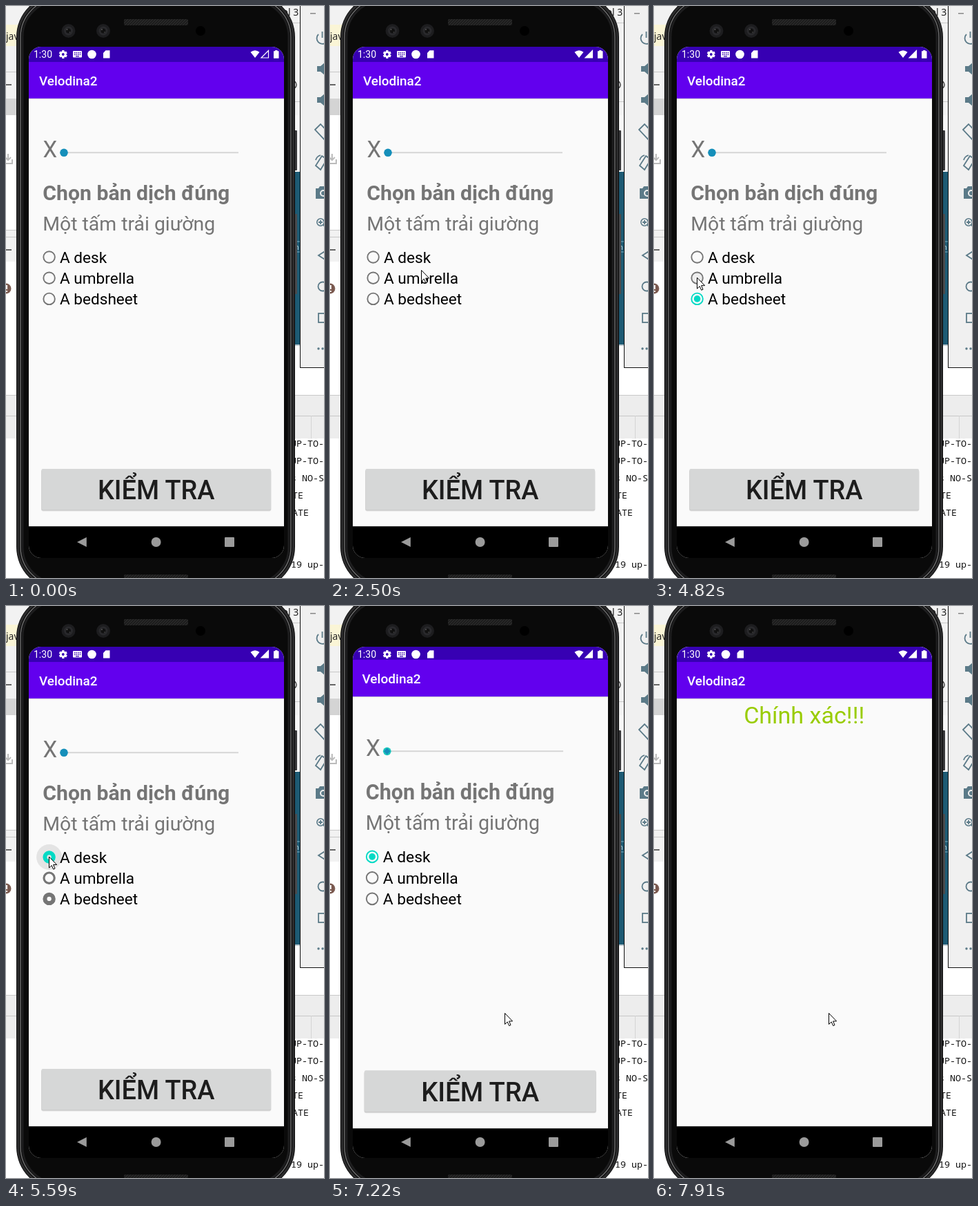
These frames come from a looping animation (461x828 px, 8 s). An HTML page:

```html
<!DOCTYPE html>
<html lang="vi">
<head>
<meta charset="utf-8">
<title>Quiz on a phone emulator</title>
<style>
html, body { margin: 0; width: 100%; height: 100%; overflow: hidden; background: #fff; }
svg { display: block; width: 461px; height: 828px; font-family: Roboto, sans-serif; }
.mono { font: 13.3px "Noto Sans Mono", monospace; fill: #111; }
</style>
</head>
<body>
<svg id="stage" viewBox="0 0 461 828"></svg>
<script>
const LOOP = 8000;
const rect = (x, y, w, h, fill, more = '') =>
  `<rect x="${x}" y="${y}" width="${w}" height="${h}" fill="${fill}" ${more}/>`;
const circle = (x, y, r, fill, more = '') =>
  `<circle cx="${x}" cy="${y}" r="${r}" fill="${fill}" ${more}/>`;
const path = (d, more = '') => `<path d="${d}" ${more}/>`;
const text = (x, y, size, fill, s, more = '') =>
  `<text x="${x}" y="${y}" font-size="${size}" fill="${fill}" ${more}>${s}</text>`;
const mono = (x, y, s) => `<text class="mono" x="${x}" y="${y}">${s}</text>`;

const RADIO_X = 62.6;
const radioY = i => 363.5 + i * 30.2;

function desktop() {
  const rule = (y, x = 0, w = 20) => rect(x, y, w, 1, '#c8c8c8');
  return rect(0, 0, 461, 828, '#fff') +
    rect(0, 0, 461, 158, '#f2f2f2') +
    rect(0, 27, 20, 31, '#faf5d6') +
    text(0, 49, 14, '#222', 'jav', 'font-family="Noto Sans, sans-serif"') +
    rule(95) + rect(0, 113, 8, 2, '#666') +
    rect(0, 134, 20, 24, '#d4d4d4') +
    path('M-4 222V228H9V222M3 214V222M-1 219L3 223L7 219', 'fill="none" stroke="#bbb" stroke-width="2"') +
    rect(0, 324, 20, 46, '#f2f2f2') + rule(324) + rule(334) + rect(0, 352, 8, 2, '#666') +
    circle(0, 409, 7.5, '#7b5a50') + rect(-1, 404, 3, 6, '#fff') + rect(-1, 412, 3, 2, '#fff') +
    rect(0, 563, 461, 63, '#ededed') + rule(563, 0, 461) + rule(593, 0, 461) +
    rect(442, 593, 1, 33, '#d4d4d4') +
    rule(24, 410) + rule(138, 410) +
    text(401, 14, 14, '#222', 'el 3', 'font-family="Noto Sans, sans-serif"') +
    circle(415, 114, 6, 'none', 'stroke="#444" stroke-width="1.5"') +
    rect(410, 158, 18, 82, '#f7f7f7') +
    rect(410, 240, 18, 250, '#1d5a73') + rect(410, 490, 18, 2, '#bcc8ce') +
    rect(415, 341, 14, 15, 'none', 'stroke="#7fb0c4"') +
    text(419, 353, 10, '#cfe3ec', 'n') +
    ['UP-TO-DATE', 'UP-TO-DATE', 's NO-SOURCE', 'TE', 'ATE'].map((s, i) =>
      mono(s.endsWith('TE') && s.length < 4 ? 415 : 413, 638 + i * 25, s)).join('') +
    mono(413, 813, '19 up-to');
}

function toolbar() {
  const line = 'fill="none" stroke="#5b7a88" stroke-width="1.8"';
  const speaker = y => path(`M451 ${y - 4}H456L462 ${y - 9}V${y + 9}L456 ${y + 4}H451Z`, 'fill="#5b7a88"');
  const dot = x => circle(x, 496, 1.7, '#5b7a88');
  return rect(426.5, -2, 40, 525.5, '#f0f0f0', 'stroke="#111"') +
    rect(441, 10, 8, 1.5, '#888') +
    path('M453 41A8 8 0 1 0 464 41M458.5 37V46', line) +
    speaker(91) + speaker(136) +
    path('M448 179L456 171L470 186L462 194Z', line) +
    path('M449 231L458 217L465 222L456 237ZM449 223A10 10 0 0 1 456 216', line) +
    path('M449 264H453L455 261H470V279H449Z', 'fill="#5b7a88"') +
    circle(460, 271, 4, 'none', 'stroke="#f0f0f0" stroke-width="2"') +
    circle(456, 313, 5.2, 'none', 'stroke="#5b7a88" stroke-width="1.6"') +
    path('M460 317L465 322M453 313H459M456 310V316', line) +
    path('M464 354L453 361L464 368', line) +
    circle(459, 406, 6.5, 'none', 'stroke="#5b7a88" stroke-width="1.8"') +
    rect(453, 445, 14, 13, 'none', 'stroke="#5b7a88" stroke-width="1.8"') +
    dot(453) + dot(459) + dot(465);
}

function phone() {
  const shell = (inset, fill, more = '') =>
    rect(15 + inset, inset - 17, 404 - 2 * inset, 862 - 2 * inset, fill, `rx="${62 - inset}" ${more}`);
  const lens = x => circle(x, 36, 10, '#1d1d1f') + circle(x, 36, 6.5, '#29292c') +
    circle(x, 36, 3.5, '#111') + circle(x - 2, 34, 1, '#555') + circle(x + 2, 38, .8, '#555');
  const grille = y => rect(171, y, 93, 9, 'url(#mesh)', 'rx="2"');
  return rect(417, 180, 5, 58, '#3a3a3c', 'rx="1"') + rect(417, 301, 5, 116, '#4a4a4c', 'rx="1"') +
    shell(0, '#0b0b0b') + shell(2.5, 'none', 'stroke="#2c2c2d" stroke-width="3"') +
    shell(6, 'none', 'stroke="#707071" stroke-width="1.4"') +
    shell(9, '#0a0a0a', 'stroke="#1d1d1e" stroke-width="3"') +
    grille(19) + grille(823) + lens(90.5) + lens(141) + circle(282, 36, 7, '#000');
}

// Window shared by both activities, with its own bars
function activity(id, body) {
  return `<g id="${id}">` + rect(33, 59, 370, 740, '#fafafa') + rect(33, 59, 370, 22.5, '#3700b3') +
    rect(33, 133.5, 370, 1.5, '#000', 'opacity=".12"') + rect(33, 81, 370, 52.8, '#6200ee') +
    text(48, 115, 18.9, '#fff', 'Velodina2', 'font-weight="500"') +
    body + rect(33, 753.2, 370, 46.8, '#000') + '</g>';
}

function quiz() {
  const answers = ['A desk', 'A umbrella', 'A bedsheet'];
  return text(53.6, 219, 33, '#757575', 'X') +
    rect(84, 211.3, 253, 1.9, '#d5d5d5') +
    circle(84, 212.3, 5.8, '#158fba', 'id="thumb"') +
    path('M84 207.5L88.8 212.3L84 217.1L79.2 212.3Z', 'fill="#158fba"') +
    text(53.3, 281, 30.2, '#757575', 'Chọn bản dịch đúng', 'font-weight="700"') +
    text(53.2, 325, 28.4, '#757575', 'Một tấm trải giường') +
    answers.map((s, i) =>
      circle(RADIO_X, radioY(i), 0, '#000', `id="ripple${i}"`) +
      circle(RADIO_X, radioY(i), 9, 'none', `id="ring${i}"`) +
      circle(RADIO_X, radioY(i), 0, '#03dac5', `id="dot${i}"`) +
      text(78, 372 + i * 30, 22.6, '#000', s)).join('') +
    rect(51, 671.5, 333.5, 60, '#000', 'rx="3" opacity=".09"') +
    rect(51.2, 670.5, 333, 60, '#000', 'rx="3" opacity=".12"') +
    rect(51.5, 670, 332.5, 59.3, '#d6d7d7', 'rx="2"') +
    `<g clip-path="url(#button)">${circle(212, 700, 0, '#000', 'id="press"')}</g>` +
    text(217.7, 714, 37.9, '#1d1d1d', 'KIỂM TRA', 'font-weight="500" text-anchor="middle"');
}

function systemIcons() {
  let teeth = '', keys = '';
  for (let a = 0; a < 360; a += 60) teeth += rect(81.2, 64, 3.2, 4, '#fff', `transform="rotate(${a} 82.8 70)"`);
  for (let i = 0; i < 8; i++) keys += rect(99 + i % 4 * 2.6, 67 + (i >> 2) * 2.6, 1.5, 1.5, '#3700b3');
  return text(40, 75, 14, '#fff', '1:30') +
    teeth + circle(82.8, 70, 3.4, 'none', 'stroke="#fff" stroke-width="2.6"') +
    `<g id="keyboard">${rect(97, 65, 13, 9.5, '#fff', 'rx="1"')}${keys}${rect(101, 72.2, 5, 1.2, '#3700b3')}</g>` +
    `<g id="notices">${circle(124.5, 70, 6.3, '#fff')}` +
    path('M144.5 64.3H150.5V75.6H141V68Z', 'fill="#fff"') + '</g>' +
    path('M354.5 66.8Q361 61.5 367.5 66.8L361 75Z', 'fill="#fff"') +
    path('M380.5 64.5V75H370Z', 'id="signal" stroke="#fff" stroke-width="1.2"') +
    path('M388 65.3H390.2V64H393.4V65.3H395.5V75.8H388Z', 'fill="#fff"') +
    path('M116.8 769V783L103 776Z', 'fill="#9b9b9b"') +
    circle(217.6, 776, 7, '#9b9b9b') + rect(317, 769, 14, 14, '#9b9b9b', 'rx="1"');
}

const stage = document.getElementById('stage');
stage.innerHTML = `<defs>
  <clipPath id="screen"><rect x="33" y="59" width="370" height="740" rx="18"/></clipPath>
  <clipPath id="button"><rect x="51.5" y="670" width="332.5" height="59.3" rx="2"/></clipPath>
  <pattern id="mesh" width="4" height="4" patternUnits="userSpaceOnUse">
    <path d="M0 0H4V4H0Z" fill="#1d1d1d"/><path d="M0 4L4 0" stroke="#303030"/></pattern>
  </defs>` + desktop() + toolbar() + phone() +
  '<g clip-path="url(#screen)">' + activity('quiz', quiz()) +
  activity('result', text(217.7, 170, 34.1, '#99cc00', 'Chính xác!!!', 'text-anchor="middle"')) +
  systemIcons() + '</g>' +
  path('M.5 .5V16.5L4.2 13L6.7 18.6L9 17.6L6.6 12H11.6Z',
    'id="cursor" fill="#fff" stroke="#000" stroke-linejoin="round"');

const el = {};
stage.querySelectorAll('[id]').forEach(n => el[n.id] = n);
const set = (id, attrs) => {
  for (const k in attrs) el[id].setAttribute(k, attrs[k]);
};
const clamp = v => Math.max(0, Math.min(1, v));
const smooth = p => p * p * (3 - 2 * p);

const APPEAR = 550, BEAT = 77.5;
const snap = t => APPEAR + Math.floor((t - APPEAR + 6) / BEAT) * BEAT;

// Radio taps: answer, time pressed
const HOLD = 110;
const taps = [[0, 3230], [1, 3680], [2, 4070], [1, 4740], [2, 5110], [0, 5390]];

// Cursor stops: arrival, travel time, x, y
const stops = [
  [870, 320, 345, 552], [2500, 1170, 132, 382], [2960, 460, 70, 360],
  ...taps.map(([i, down]) => [down - 100, 180, 62, radioY(i) - 1]),
  [6120, 400, 212, 698], [6900, 400, 253, 589]
];
function cursorAt(t) {
  let x = 395, y = 805;
  for (const [at, travel, toX, toY] of stops) {
    const p = smooth(clamp(1 + (t - at) / travel));
    x += (toX - x) * p;
    y += (toY - y) * p;
  }
  return [x, y];
}

function drawRadio(i, t) {
  let on = false, since = LOOP, grow = 0, fade = 1;
  for (const [n, down] of taps) {
    const up = down + HOLD;
    if (t >= up && on !== (n === i)) {
      on = n === i;
      since = t - up;
    }
    if (n === i && t >= down) {
      grow = clamp((t - down) / 170);
      fade = clamp((t - up) / 340);
    }
  }
  // The ring fills inward, then opens again
  const fill = Math.min(clamp(since / 150), clamp((400 - since) / 190));
  const width = 1.9 + 7.1 * fill;
  set('ring' + i, { r: 9.2 - width / 2, 'stroke-width': width, stroke: on ? '#03dac5' : '#757575' });
  set('dot' + i, { r: on && since > 170 ? 4.8 : 0 });
  set('ripple' + i, { r: 18.5 * grow, opacity: .12 * grow * (1 - fade) });
}

const zoom = s => `translate(218 429) scale(${s}) translate(-218 -429)`;

function draw(time) {
  const t = snap(time);
  set('cursor', { transform: `translate(${cursorAt(t)})`, opacity: t >= APPEAR ? 1 : 0 });
  set('signal', { fill: t >= 1010 ? '#fff' : 'none' });
  for (let i = 0; i < 3; i++) drawRadio(i, t);

  set('press', { r: Math.max(0, (t - 6280) * .67), opacity: .06 * (1 - clamp((t - 6560) / 330)) });

  // The quiz zooms away while the result opens over it
  const p = 1 - Math.exp(-((Math.max(0, t - 7163) / 95.5) ** 2.6));
  set('quiz', { transform: zoom(1 + .05 * p) });
  set('result', { transform: zoom(.85 + .15 * p), opacity: clamp((t - 7220) / 60) });
  set('thumb', { fill: p > 0 ? '#1cc9bd' : '#158fba' });

  const gone = clamp((t - 7757) / 155);
  set('keyboard', { opacity: 1 - gone });
  set('notices', { transform: `translate(${-20.5 * gone} 0)` });
}

let start;
function tick(now) {
  start ??= now;
  draw((now - start) % LOOP);
  requestAnimationFrame(tick);
}
draw(0);
requestAnimationFrame(tick);
</script>
</body>
</html>
```
